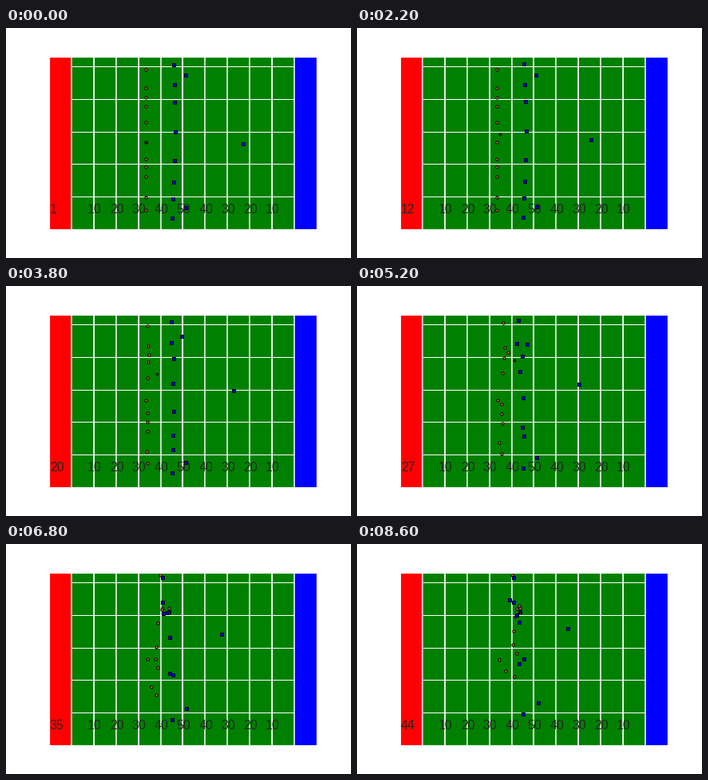
Animation of 432x288 px, one loop 8800 ms. Source, as a matplotlib script:

```python
import numpy as np
import matplotlib.pyplot as plt
from matplotlib.animation import FuncAnimation
from matplotlib.patches import Rectangle
from matplotlib.transforms import Affine2D

W, H, DPI = 432, 288, 72
FRAMES, INTERVAL = 44, 200
KICK, LANDING = 8, 31
TEE, CATCH = np.array([176, 143]), np.array([204, 86])


def run(frame, start, pace):
    """Share of the way covered: speed up, cruise, then stop on arrival."""
    ramp = 16.7
    t = max(frame - start, 0)
    covered = t * t / (2 * ramp) if t < ramp else t - ramp / 2
    return min(1, pace * covered / (FRAMES - 1 - start - ramp / 2))


class Runner:
    def __init__(self, x, y, end, start, pace):
        self.home, self.end = np.array([x, y]), np.array(end)
        self.start, self.pace = start, pace

    def at(self, frame):
        share = run(frame, self.start, self.pace)
        return self.home + (self.end - self.home) * share


def kicker(y, end, pace=1.0):
    return Runner(175.5, y, end, 11, pace)


def receiver(y, end, pace=1.1, x=None, start=9):
    line = 213 - abs(y - 120) / 25
    return Runner(line if x is None else x, y, end, start, pace)


kickers = [
    kicker(52, (194, 39), 1.6),
    kicker(75, (200, 81), 1.4),
    kicker(87, (204, 80), 1.7),
    kicker(98, (203, 77), 1.2),
    kicker(118, (198, 91), 1.1),
    kicker(143, (178, 145)),
    kicker(164, (196, 109)),
    kicker(174, (195, 126)),
    kicker(186, (200, 137)),
    kicker(212, (186, 159)),
    kicker(228, (197, 166)),
]
receivers = [
    receiver(46, (196, 42), 1.6),
    receiver(59, (200, 89), 1.4, x=225),
    receiver(71, (196, 73), 2.0),
    receiver(93, (204, 85), 1.8),
    receiver(130, (191, 70)),
    receiver(166, (203, 98)),
    receiver(193, (203, 150)),
    receiver(214, (209, 144)),
    receiver(225, (227, 199), x=225),
    receiver(238, (208, 213)),
    receiver(145, (264, 106), x=297, start=0),
]


def ball_at(frame):
    u = np.clip((frame - KICK) / (LANDING - KICK), 0, 1)
    return TEE + (CATCH - TEE) * np.array([u, 1 - (1 - u) ** 1.3])


fig = plt.figure(figsize=(W / DPI, H / DPI), dpi=DPI, facecolor="white")
ax = fig.add_axes([0.125, 0.125, 0.775, 0.75], facecolor="green")
ax.set(xlim=(0, 120), ylim=(0, 53), xticks=range(0, 121, 20), yticks=range(0, 51, 10))
ax.set_axisbelow(True)
ax.grid(color="white", lw=1)
ax.tick_params(length=0, labelbottom=False, labelleft=False)
for spine in ax.spines.values():
    spine.set(color="white", lw=1.25)
# Players move in pixels, measured from the top left of the stage.
pixels = Affine2D().translate(-0.5, -0.5).scale(1, -1).translate(0, H)


def label(x, text):
    return ax.text(x, 5, text, size=16, color="#262626",
                   family="Liberation Sans", va="baseline", zorder=5)


def yard_line(x):
    ax.plot([x, x], [0, 53], color="white", lw=1.5, zorder=2)


for x, color in ((0, "red"), (110, "blue")):
    ax.add_patch(Rectangle((x, 0), 10, 53, fc=color, ec=color, lw=1))
for x in range(10, 120, 10):
    yard_line(x)
yard_line(60)
for yards in range(10, 100, 10):
    label(yards + 7.2, str(50 - abs(50 - yards)))
counter = label(0.3, "")


def markers(shape, size, color, z):
    return ax.plot([], [], shape, ms=size, mfc=color, mec="black", mew=1,
                   zorder=z, transform=pixels)[0]


kicker_dots = markers("o", 3.2, "#ff7070", 3)
receiver_dots = markers("s", 4, "blue", 3.1)
ball_dot = markers("o", 2.6, "saddlebrown", 3.2)


def update(frame):
    for dots, team in ((kicker_dots, kickers), (receiver_dots, receivers)):
        dots.set_data(*np.transpose([player.at(frame) for player in team]))
    ball_dot.set_data(*ball_at(frame).reshape(2, 1))
    counter.set_text(str(frame + 1))
    return kicker_dots, receiver_dots, ball_dot, counter


anim = FuncAnimation(fig, update, frames=FRAMES, interval=INTERVAL,
                     repeat=True, repeat_delay=0)
plt.show()
```
